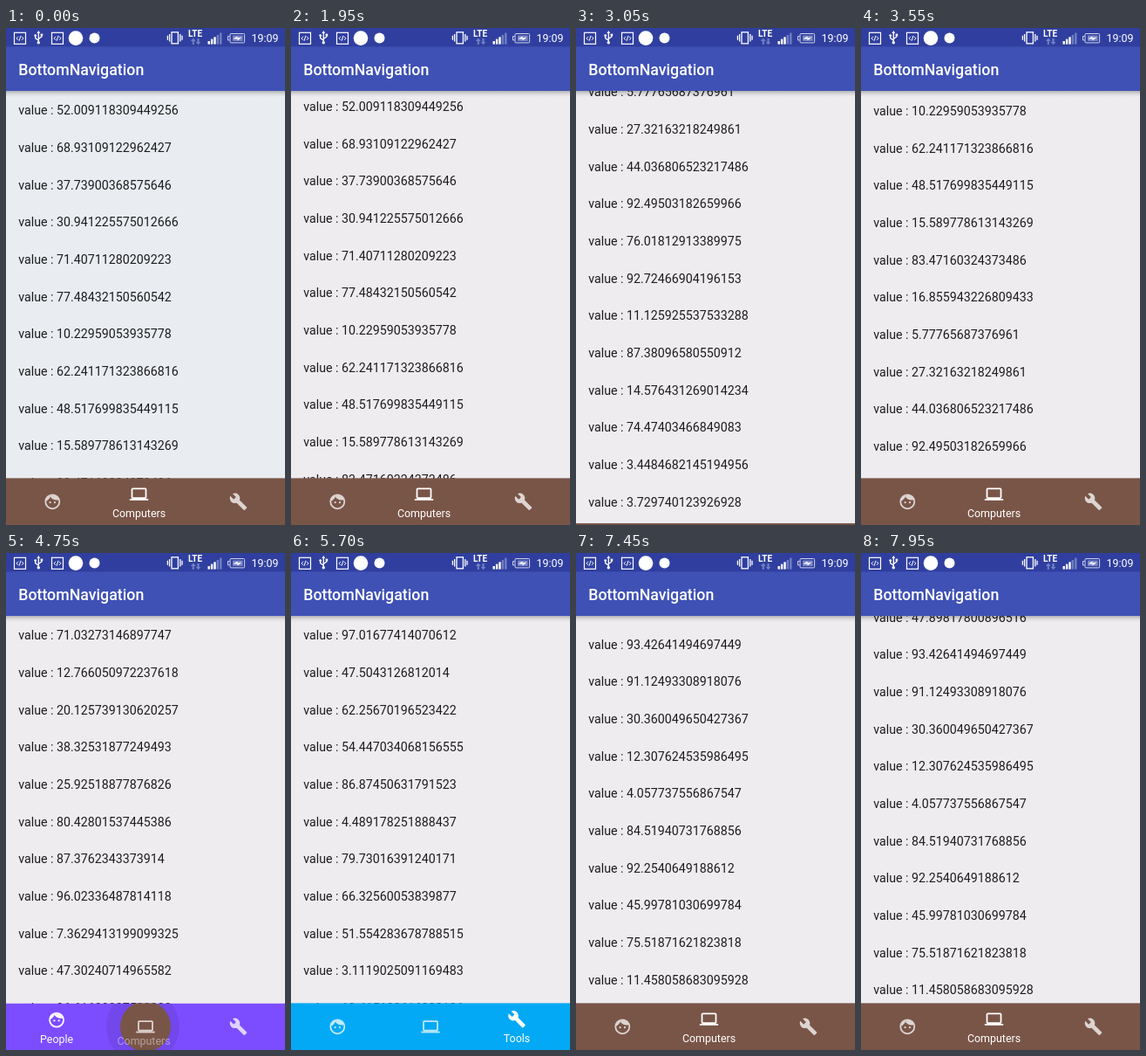
These frames come from a looping animation (320x569 px, 8000 ms). An HTML page:

```html
<!DOCTYPE html>
<html lang="en">
<head>
<meta charset="utf-8">
<title>Bottom navigation</title>
<style>
  html, body { margin: 0; width: 100%; height: 100%; overflow: hidden; background: #eeecef; }
  svg { display: block; width: 320px; height: 569px; font-family: Roboto, sans-serif; }
  .row { font-size: 14.22px; fill: #1d1c1e; }
  .label { font-size: 12.44px; fill: #fff; text-anchor: middle; }
</style>
</head>
<body>
<svg viewBox="0 0 320 569" xmlns="http://www.w3.org/2000/svg">
  <defs>
    <linearGradient id="shade" x2="0" y2="1">
      <stop offset="0" stop-color="#000" stop-opacity=".25"/>
      <stop offset=".5" stop-color="#000" stop-opacity=".08"/>
      <stop offset="1" stop-color="#000" stop-opacity="0"/>
    </linearGradient>
    <clipPath id="barClip"><rect y="515.5" width="320" height="54"/></clipPath>
    <g id="code" fill="none" stroke="#fff">
      <rect x="-6.5" y="-6.5" width="13" height="13" stroke-width="1.2"/>
      <path d="M-2-2L-4 0l2 2M2-2L4 0 2 2M1-3L-1 3"/>
    </g>
    <g id="People" fill="#fff">
      <circle cx="12" cy="12" r="9" fill="none" stroke="#fff" stroke-width="2"/>
      <path d="M4 11.2c2.4-1 4.3-3 5.2-5.4C11 8.3 14 10 17.4 10h3A9 9 0 0 0 3 11.5z"/>
      <circle cx="9" cy="13" r="1.25"/>
      <circle cx="15" cy="13" r="1.25"/>
    </g>
    <g id="Computers" fill="#fff">
      <rect x="3" y="5" width="18" height="12" rx="1" fill="none" stroke="#fff" stroke-width="2"/>
      <rect y="18" width="24" height="2"/>
    </g>
    <path id="Tools" fill="#fff" d="M22.7 19l-9.1-9.1c.9-2.3.4-5-1.5-6.9-2-2-5-2.4-7.4-1.3L9 6 6 9 1.6 4.7C.4 7.1.9 10.1 2.9 12.1c1.9 1.9 4.6 2.4 6.9 1.5l9.1 9.1c.4.4 1 .4 1.4 0l2.3-2.3c.5-.4.5-1.1.1-1.4z"/>
  </defs>

  <rect id="page" width="320" height="569"/>
  <g id="rows"></g>

  <g id="bar">
    <g clip-path="url(#barClip)">
      <rect id="base" y="515.5" width="320" height="54"/>
      <circle id="touch" cy="542" r="42"/>
      <circle id="reveal" cy="542"/>
    </g>
    <g id="tabs"></g>
  </g>

  <rect y="72" width="320" height="7" fill="url(#shade)"/>
  <rect y="21" width="320" height="51" fill="#3f51b5"/>
  <rect width="320" height="21.4" fill="#303f9f"/>
  <text x="14.2" y="53.7" font-size="17.78" font-weight="500" fill="#fff">BottomNavigation</text>

  <use href="#code" x="16" y="11.8"/>
  <use href="#code" x="59" y="11.8"/>
  <g fill="#fff">
    <path d="M37.3 5v11M37.3 14.2l-3.6-2.6V9M37.3 12.4l3.6-2.4V8" fill="none" stroke="#fff" stroke-width="1.3"/>
    <path d="M35.4 6l1.9-3 1.9 3z"/>
    <circle cx="37.3" cy="16.8" r="1.7"/>
    <circle cx="33.7" cy="8.6" r="1.4"/>
    <rect x="39.6" y="6.6" width="2.6" height="2.6"/>
    <circle cx="80" cy="11.6" r="8.3"/>
    <circle cx="101.5" cy="11.5" r="6"/>
  </g>
  <g fill="none" stroke="#fff" stroke-width="1.3">
    <rect x="190" y="4.8" width="7.4" height="13"/>
    <path d="M187.6 7v8.6M185.4 8.8v5M199.8 7v8.6M202 8.8v5"/>
  </g>
  <text x="217" y="9.8" font-size="10" font-weight="700" fill="#fff" text-anchor="middle">LTE</text>
  <path d="M213.8 19v-4h-2l3-3.4 3 3.4h-2v4zM219.4 12v4h-1.8l2.9 3.2 2.9-3.2h-1.8v-4z" fill="#7180c4"/>
  <g id="signal"></g>
  <g stroke="#cfd3ea" fill="none">
    <rect x="257" y="6.5" width="16.6" height="10.4" rx="1"/>
    <path d="M256.5 9.5h-2v4.4h2"/>
    <rect x="260" y="8.5" width="11.6" height="6.4" fill="#7d89c8" stroke="none"/>
    <path d="M260.5 12.6l5-3v2l5-1.2-5 4v-2z" fill="#fff" stroke="none"/>
  </g>
  <text x="281.6" y="16" font-size="12.44" fill="#fff">19:09</text>
</svg>

<script>
const LOOP = 8000, STEP = 50;
const ROW = 128 / 3, FIRST = 99.2, BAR = 54;
const BROWN = '#795548', PURPLE = '#7c4dff', BLUE = '#03a9f4';
const $ = id => document.getElementById(id);

function add(parent, tag, attrs, text = '') {
  const el = document.createElementNS('http://www.w3.org/2000/svg', tag);
  set(el, attrs);
  el.textContent = text;
  parent.append(el);
  return el;
}
function set(el, attrs) {
  for (const k in attrs) el.setAttribute(k, attrs[k]);
}
function smooth(u) {
  u = Math.min(1, Math.max(0, u));
  return u * u * (3 - 2 * u);
}

// 48-bit linear congruential generator of java.util.Random, in 24-bit halves.
const HALF = 2 ** 24;
function next([hi, lo]) {
  const p = lo * 0xece66d + 11;
  const carry = Math.floor(p / HALF);
  const q = hi * 0xece66d + lo * 0x5de + carry;
  return [q - Math.floor(q / HALF) * HALF, p - carry * HALF];
}
function percent(a, b) {
  const top = a[0] * 4 + (a[1] >> 22), low = b[0] * 8 + (b[1] >> 21);
  return (top * 2 ** 27 + low) / 2 ** 53 * 100;
}

// Finds the hidden state behind the first value, then continues its sequence.
function sequence(first, count = 48) {
  const top = Math.floor(first / 100 * 2 ** 26);
  let a, b;
  for (let rest = 0; rest < 2 ** 22; rest++) {
    a = [top >> 2, (top & 3) * 2 ** 22 + rest];
    b = next(a);
    if (percent(a, b) === first) break;
  }
  const values = [first];
  while (values.length < count) {
    a = next(b);
    b = next(a);
    values.push(percent(a, b));
  }
  return values;
}

// Each move is [start, end, distance]; `from` is the row of the first value.
const phases = [
  { at: 0, tab: 1, color: BROWN, values: sequence(52.009118309449256),
    moves: [[1900, 2857, 550], [2950, 3650, -312]], hide: 2020, show: 3012 },
  { at: 4000, tab: 0, color: PURPLE, values: sequence(64.28170359142738) },
  { at: 4750, tab: 1, color: BROWN, values: sequence(71.03273146897747) },
  { at: 5250, tab: 2, color: BLUE, values: sequence(97.01677414070612) },
  { at: 5850, tab: 1, color: BROWN, values: sequence(47.89817800896516), from: 7,
    moves: [[6250, 6700, 354.1], [6700, 7150, -23], [7400, 7950, -11.8]], hide: 6330, show: 6712 }
];

const tabs = [
  { name: 'People', rest: 53.3, active: 58.6 },
  { name: 'Computers', rest: 160, active: 152.5 },
  { name: 'Tools', rest: 266.5, active: 259 }
];
for (const tab of tabs) {
  tab.icon = add($('tabs'), 'use', { href: '#' + tab.name });
  tab.label = add($('tabs'), 'text', { class: 'label' }, tab.name);
}
const rows = Array.from({ length: 14 }, () => add($('rows'), 'text', { class: 'row', x: 14.2 }));
for (let i = 0; i < 5; i++) {
  const height = 3.6 + 2.35 * i;
  add($('signal'), 'rect', {
    x: 231.5 + 3.4 * i, y: 18.6 - height, width: 2.4, height, fill: i < 3 ? '#fff' : '#7180c4'
  });
}

function drawTab(tab, iconOn, labelOn) {
  const x = on => tab.rest + (tab.active - tab.rest) * on;
  set(tab.icon, {
    transform: `translate(${x(iconOn)} ${542.3 - 8.6 * iconOn}) scale(.889) translate(-12 -12)`,
    opacity: 0.75 + 0.25 * iconOn
  });
  set(tab.label, { x: x(labelOn), y: 563.5 - 3.3 * labelOn, opacity: Math.min(1, labelOn * 1.7) });
}

function draw(t) {
  const n = phases.findLastIndex(p => p.at <= t);
  const prev = phases[n - 1];
  const { at, tab, color, values, from = 0, moves = [], hide = LOOP, show = LOOP } = phases[n];
  const since = prev ? t - at : Infinity;

  $('page').setAttribute('fill', t < 1950 ? '#e9edf1' : '#eeecef');

  const scroll = moves.reduce((sum, [a, b, by]) => sum + by * smooth((t - a) / (b - a)), 0);
  const top = Math.max(0, Math.floor(scroll / ROW) - 1);
  rows.forEach((row, i) => {
    row.textContent = 'value : ' + values.at(top + i - from);
    row.setAttribute('y', FIRST + (top + i) * ROW - scroll);
  });

  const hidden = smooth((t - hide) / 300) - smooth((t - show) / 300);
  $('bar').setAttribute('transform', `translate(0 ${BAR * hidden})`);

  const open = smooth(since / 300);
  const cx = tabs[tab].rest;
  $('base').setAttribute('fill', open < 1 ? prev.color : color);
  set($('touch'), { cx: cx - 3, opacity: 0.08 * (1 - open) });
  set($('reveal'), { cx, r: 29 + 250 * open, fill: color });

  tabs.forEach((each, i) => {
    if (i === tab) {
      drawTab(each, smooth(since / 300), smooth((since + 100) / 300));
    } else {
      const left = prev && i === prev.tab ? 1 - smooth((since + 50) / 250) : 0;
      drawTab(each, left, left);
    }
  });
}

const start = performance.now();
function tick() {
  const t = (performance.now() - start) % LOOP;
  draw(Math.floor(t / STEP) * STEP);
  requestAnimationFrame(tick);
}
tick();
</script>
</body>
</html>
```
